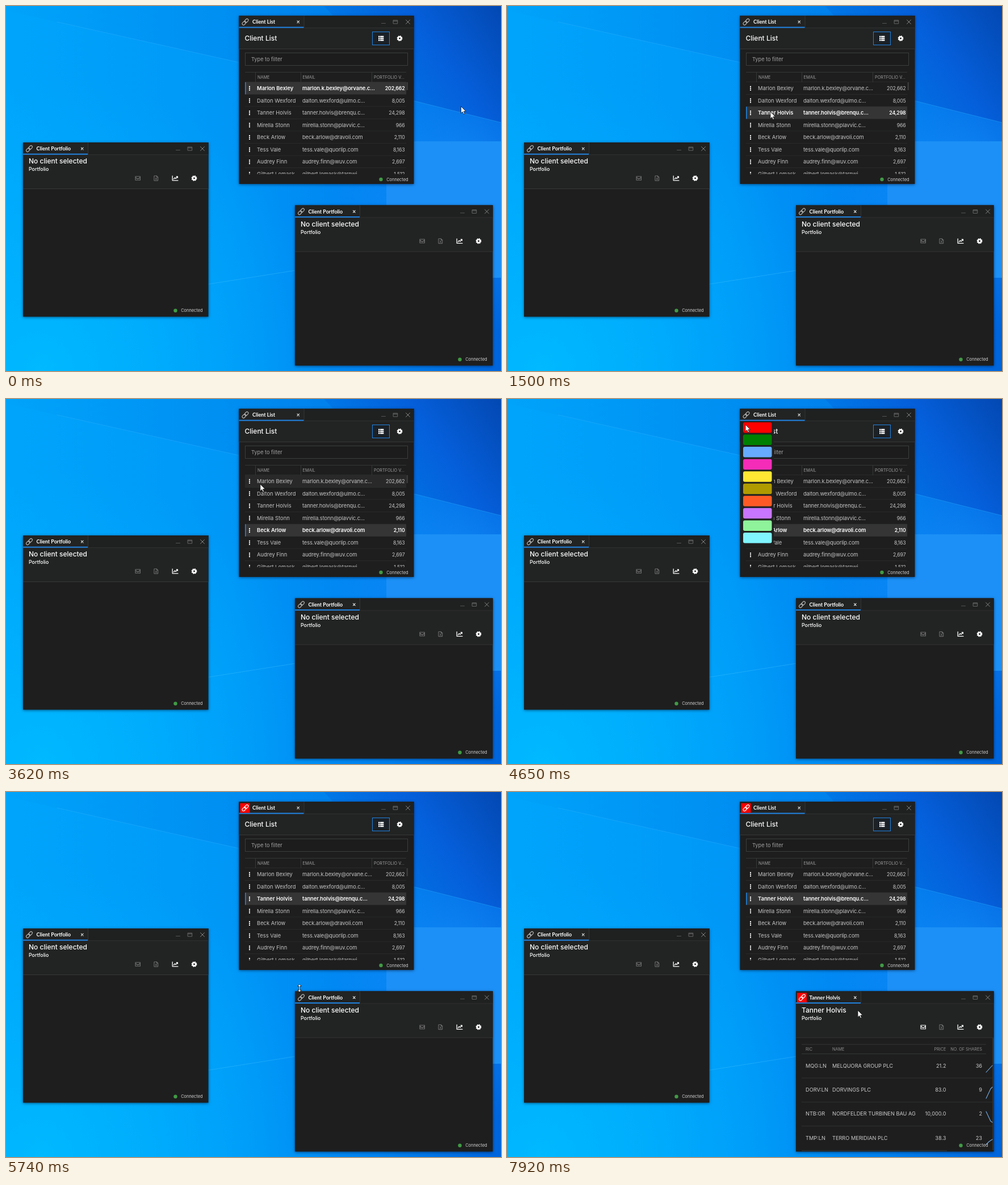
Animation of 872x642 px, one loop 7990 ms. Source, as an HTML page:

```html
<!DOCTYPE html>
<html lang="en">
<head>
<meta charset="utf-8">
<title>Linked client windows</title>
<style>
html, body { margin: 0; width: 100%; height: 100%; overflow: hidden; background: #0090f0; }
svg { display: block; width: 872px; height: 642px; font-family: Inter, "Open Sans", sans-serif; }
.tab { font-family: Lato, "Open Sans", sans-serif; font-weight: 700; }
.line { fill: none; stroke-linecap: round; stroke-linejoin: round; }
.window { filter: drop-shadow(0 1px 2.5px rgba(0, 20, 50, .6)); }
</style>
</head>
<body>
<svg id="stage" viewBox="0 0 872 642" xmlns="http://www.w3.org/2000/svg"></svg>
<script>
const LOOP = 7990;
const BLUE = '#1f82e0';
const ROW_TOP = 134, ROW_H = 21.57;

const clients = [
  ['Marlon Bexley', 'marlon.k.bexley@orvane.c...', '202,662'],
  ['Dalton Wexford', 'dalton.wexford@ulmo.c...', '8,005'],
  ['Tanner Holvis', 'tanner.holvis@brenqu.c...', '24,298'],
  ['Mirella Stonn', 'mirella.stonn@plavvic.c...', '966'],
  ['Beck Arlow', 'beck.arlow@dravoli.com', '2,110'],
  ['Tess Vale', 'tess.vale@quorlip.com', '8,163'],
  ['Audrey Finn', 'audrey.finn@wuv.com', '2,697'],
  ['Gilbert Lomask', 'gilbert.lomask@tarnwi...', '1,512']
];
const holdings = [
  ['MQG:LN', 'MELQUORA GROUP PLC', '21.2', '36', 'M844 493L855 481'],
  ['DORV:LN', 'DORVINGS PLC', '83.0', '9', 'M844 539L852 522L855 519'],
  ['NTB:GR', 'NORDFELDER TURBINEN BAU AG', '10,000.0', '2', 'M844 562L852 579L855 581'],
  ['TMP:LN', 'TERRO MERIDIAN PLC', '38.3', '23', 'M844 620L849 615L855 611']
];
const swatches = ['#ff0000', '#008000', '#66abff', '#f42cb8', '#ffe733',
  '#b09b00', '#ff5a26', '#c876ff', '#8ef39a', '#80f5ff'];

// start, end, steps, destination
const moves = [
  [480, 1060, 11, 464, 186],
  [1820, 2130, 6, 466, 230],
  [3310, 4080, 14, 420, 26],
  [4410, 4650, 4, 420, 45],
  [5140, 5680, 10, 517, 333],
  [5740, 5740, 1, 517, 345],
  [5810, 5910, 2, 519, 358],
  [6240, 6490, 4, 581, 359],
  [6560, 6680, 3, 523, 376],
  [7260, 7260, 1, 524, 376],
  [7450, 7450, 1, 525, 376],
  [7610, 7920, 6, 618, 384]
];
const clicks = [[1250, 1500], [2330, 2610], [4140, 4340], [4900, 5080], [5990, 6150], [6870, 7070]];
const picks = [[0, 0], [1380, 2], [2460, 4], [5020, 2]];

const rect = (x, y, w, h, fill, extra = '') =>
  `<rect x="${x}" y="${y}" width="${w}" height="${h}" fill="${fill}" ${extra}/>`;
const path = (d, stroke, width = 1, extra = '') =>
  `<path class="line" d="${d}" stroke="${stroke}" stroke-width="${width}" ${extra}/>`;
const text = (x, y, s, size, fill, extra = '') =>
  `<text x="${x}" y="${y}" font-size="${size}" fill="${fill}" ${extra}>${s}</text>`;
const group = (id, body, extra = '') => `<g id="${id}" ${extra}>${body}</g>`;
const at = (x, y, body) => `<g transform="translate(${x} ${y})">${body}</g>`;
const END = 'text-anchor="end"';

const icons = {
  link: color => `<g transform="rotate(-45)" fill="none" stroke="${color}" stroke-width="1.1">
    <rect x="-6.7" y="-2.3" width="7.4" height="4.6" rx="2.3"/>
    <rect x="-.7" y="-2.3" width="7.4" height="4.6" rx="2.3"/></g>`,
  gear: () => `<g fill="none" stroke="#fff"><circle r="2.7" stroke-width="2.5"/>
    <circle r="4.2" stroke-width="1.5" stroke-dasharray="1.9 1.4"/></g>`,
  chart: () => path('M-4.8-4V3.8H5', '#fff', 1.3) +
    path('M-2.6 1.2L-.6-1L1 .5L4.2-2.8M2.2-3H4.4V-.8', '#fff', 1.3),
  mail: color => path('M-4.2-3.2H4.2V3.2H-4.2ZM-4.2-1.5L0 1.3L4.2-1.5', color, 1.1),
  sheet: () => path('M-3.2-4.2H1L3.2-2V4.2H-3.2ZM1-4.2V-2H3.2M-1.2-.6L1.2 2.6M1.2-.6L-1.2 2.6', '#747474', 1),
  list: () => [-3.2, 0, 3.2].map(y => rect(-4.7, y - 1.2, 2.4, 2.4, '#fff') + rect(-1.6, y - 1.2, 6.3, 2.4, '#fff')).join('')
};

function wallpaper() {
  return `<defs>
    <linearGradient id="sky"><stop offset="0" stop-color="#00a5fb"/><stop offset=".45" stop-color="#0097f7"/>
      <stop offset=".75" stop-color="#0082f0"/><stop offset="1" stop-color="#0065dd"/></linearGradient>
    <radialGradient id="glow" cx="60" cy="640" r="520" gradientUnits="userSpaceOnUse">
      <stop offset="0" stop-color="#00b9ff"/><stop offset="1" stop-color="#00b0ff" stop-opacity="0"/></radialGradient>
    <radialGradient id="halo" cx="800" cy="330" r="250" gradientUnits="userSpaceOnUse">
      <stop offset="0" stop-color="#1a94ff" stop-opacity=".8"/><stop offset="1" stop-color="#1088f8" stop-opacity="0"/></radialGradient>
    <linearGradient id="dusk" x1="640" y1="160" x2="872" y2="0" gradientUnits="userSpaceOnUse">
      <stop offset="0" stop-color="#0068dd" stop-opacity=".2"/><stop offset=".5" stop-color="#0560dc"/>
      <stop offset="1" stop-color="#0348b2"/></linearGradient>
    <linearGradient id="beam" x1="0" y1="0" x2="720" y2="0" gradientUnits="userSpaceOnUse">
      <stop offset="0" stop-color="#0086ea" stop-opacity=".05"/><stop offset="1" stop-color="#0070e0" stop-opacity=".5"/></linearGradient>
    <clipPath id="listClip"><rect x="420" y="134" width="289" height="161.5"/></clipPath>
  </defs>` +
    rect(0, 0, 872, 642, 'url(#sky)') + rect(0, 0, 872, 642, 'url(#glow)') + rect(0, 0, 872, 642, 'url(#halo)') +
    `<path d="M0 0H872V205L719 167L410 99L90 28L0 8Z" fill="url(#beam)"/>
     <path d="M560 0H872V205L719 167Z" fill="url(#dusk)"/>` +
    path('M90 28L410 99M719 167L872 205', '#35b4ff', 1, 'opacity=".4"') +
    path('M130 525L510 465', '#45c4ff', 1, 'opacity=".4"') +
    rect(670, 238, 240, 240, '#1c90f6');
}

function frameOf(id, x, y, w, h, title, headH, statusUp) {
  const r = x + w, cy = y + 11;
  return rect(x, y, w, h, '#1e1e1e', 'class="window"') +
    rect(x, y, w, headH, '#222323') +
    rect(x + 114, y, w - 114, 21, '#1f2020') +
    rect(x, y + 21, w, 1, '#303131') +
    rect(x + 114, y, 1, 21, '#343535') +
    rect(x, y + 19.6, 114, 2, BLUE) +
    rect(x, y + headH, w, 1, '#363737') +
    group(id + 'Red', rect(x + 2, y + 2.8, 17, 16.8, '#f00')) +
    at(x + 11, cy, group(id + 'Link', icons.link('#b4b4b4'))) +
    text(x + 23.5, y + 14.4, title, 9, '#fff', `class="tab" id="${id}Tab"`) +
    path(`M${x + 102.5} ${y + 9.2}l3.6 3.6m0-3.6l-3.6 3.6`, '#eee', 1.1) +
    path(`M${r - 57} ${y + 13.5}h7`, '#555', 1) +
    path(`M${r - 36} ${y + 8}h7.2v6h-7.2zM${r - 36} ${y + 9.6}h7.2`, '#666', 1) +
    path(`M${r - 14} ${y + 7.5}l7 7m0-7l-7 7`, '#858585', 1) +
    at(r, y + h - statusUp, '<circle cx="-58" r="3.2" fill="#419a45"/>');
}

const status = (r, cy) => text(r - 10, cy + 2.7, 'Connected', 7.4, '#d0d0d0', END);

function clientRow([name, mail, value], i) {
  const y = ROW_TOP + i * ROW_H, base = y + 14;
  const cell = (x, s, extra = '') => text(x, base, s, 9.4, '#c4c4c4', extra);
  const dots = [-3, 0, 3].map(d => rect(428, y + 9.8 + d, 2, 2, '#fff')).join('');
  return group('row' + i,
    rect(421, y, 284, ROW_H, '#333') +
    rect(421, y + ROW_H - .5, 284, 1, '#353636') +
    rect(421, y, 1.6, ROW_H, BLUE) + dots +
    cell(442, name) + cell(522, mail, 'letter-spacing="-.12"') +
    text(702.5, base, value, 8.8, '#c4c4c4', END + ' letter-spacing="-.2"'));
}

function clientList() {
  const label = (x, s) => text(x, 127.8, s, 7.3, '#9c9c9c');
  return frameOf('a', 410.5, 17, 308, 296, 'Client List', 58, 8) +
    text(420.5, 61, 'Client List', 12, '#fff', 'font-weight="500"') +
    rect(645.5, 45.5, 30, 23, '#1b2127', `stroke="${BLUE}"`) +
    at(660.7, 57, icons.list()) + at(693.5, 57, icons.gear()) +
    rect(421.5, 82.5, 286, 22, '#1c1c1c', 'stroke="#3b3c3c"') +
    text(432, 97, 'Type to filter', 9.2, '#a2a2a2') +
    rect(421, 116, 284, 1, '#353636') + rect(421, 133.5, 284, 1, '#353636') +
    [439, 519, 644].map(x => rect(x, 117, 1, 17, '#353636')).join('') +
    label(443, 'NAME') + label(522.5, 'EMAIL') + label(648, 'PORTFOLIO V...') +
    `<g clip-path="url(#listClip)">${clients.map(clientRow).join('')}${rect(705.5, 134, 2.5, 14, '#3b3b3b')}</g>` +
    status(718.5, 305);
}

function portfolio(id, x, y, w, h, body = '') {
  const r = x + w, iy = y + 63;
  return frameOf(id, x, y, w, h, 'Client Portfolio', 81, 10.8) +
    text(x + 10, y + 37.2, 'No client selected', 12, '#fff', `font-weight="500" id="${id}Title"`) +
    text(x + 10, y + 50.4, 'Portfolio', 8.8, '#fff', 'font-weight="500"') +
    at(r - 124.3, iy, group(id + 'Mail', icons.mail('#747474'))) +
    at(r - 92, iy, icons.sheet()) + at(r - 58.5, iy, icons.chart()) + at(r - 25, iy, icons.gear()) +
    body + status(r, y + h - 10.8);
}

function holdingsTable() {
  const label = (x, s, extra) => text(x, 454.8, s, 7.3, '#8e8e8e', extra);
  const heads = label(526, 'RIC') +
    group('wide', label(569, 'NAME') + label(664, 'PRICE') + label(765, 'NO. OF SHARES')) +
    group('fitted', label(573, 'NAME') + label(773.5, 'PRICE', END) + label(837, 'NO. OF SHARES', END) +
      rect(855, 433, 2, 197, '#303131') + rect(519, 630, 256, 1.5, '#303131'));
  const rows = holdings.map(([code, name, price, count, trend], i) => {
    const cell = (x, s, extra) => text(x, 484.8 + i * 42.3, s, 9.2, '#cacaca', extra);
    const rule = i < 3 ? rect(519, 502.5 + i * 42.3, 336, 1, '#303131') : '';
    return cell(526, code) + cell(573, name) + cell(773.5, price, END) + cell(837, count, END) +
      rule + path(trend, '#78aee6', 1.1);
  }).join('');
  return group('table', rect(519, 443.5, 325, 1, '#343535') + rect(519, 460, 325, 1, '#343535') +
    heads + group('rows', rows));
}

function palette(id, x, y) {
  return group(id, rect(x, y, 59, 218, '#202121') +
    swatches.map((c, i) => rect(x + 5, y + 2 + i * 21.55, 50.5, 18.5, c, 'rx="3"')).join(''));
}

const stage = document.getElementById('stage');
stage.innerHTML = wallpaper() + portfolio('b', 30, 240, 326.5, 306.5) + clientList() +
  portfolio('c', 509, 350.5, 348.5, 282, holdingsTable()) +
  palette('listPalette', 411, 39) + palette('portfolioPalette', 510, 371.5) +
  '<circle id="click" r="9" fill="#f0dc00" opacity=".72"/>' +
  group('arrow', '<path d="M0 0V12.2L2.8 9.6L4.6 13.8L6.6 13L4.8 8.8H8.6Z" fill="#fff" stroke="#111" stroke-width=".8"/>') +
  group('resize', '<path d="M0-7L3.4-3.4H1V3.4H3.4L0 7L-3.4 3.4H-1V-3.4H-3.4Z" fill="#fff" stroke="#111" stroke-width=".8"/>');

const el = {};
stage.querySelectorAll('[id]').forEach(n => el[n.id] = n);
const show = (id, on) => el[id].setAttribute('visibility', on ? 'visible' : 'hidden');
const place = (id, x, y) => el[id].setAttribute('transform', `translate(${x} ${y})`);
const within = (t, a, b) => t >= a && t < b;
const ease = p => p * p * (3 - 2 * p);

function pointer(t) {
  let x = 801.5, y = 176.5;
  for (const [a, b, n, tx, ty] of moves) {
    if (t < a) break;
    const step = b > a ? Math.min(n, Math.floor((t - a) / (b - a) * (n - 1) + 1e-6) + 1) : n;
    const p = ease(step / n);
    x += (tx - x) * p;
    y += (ty - y) * p;
  }
  return [x, y];
}

function paintRows(selected, hovered) {
  clients.forEach((_, i) => {
    const on = i === selected;
    const [back, , mark] = el['row' + i].querySelectorAll('rect');
    back.setAttribute('fill', on ? '#353535' : i === hovered ? '#292929' : '#1e1e1e');
    mark.setAttribute('visibility', on ? 'visible' : 'hidden');
    el['row' + i].querySelectorAll('text').forEach(n => {
      n.setAttribute('fill', on ? '#fff' : '#c4c4c4');
      n.setAttribute('font-weight', on ? 600 : 400);
    });
  });
}

function render(t) {
  const [x, y] = pointer(t);
  const listOpen = within(t, 4280, 4960), portfolioOpen = within(t, 6110, 6870);
  const overRows = !listOpen && x >= 421 && x <= 705 && y >= ROW_TOP && y < 295;
  const selected = picks.filter(p => p[0] <= t).pop()[1];
  paintRows(selected, overRows ? Math.floor((y - ROW_TOP) / ROW_H) : -1);

  const loaded = t >= 6870, linked = t >= 6970;
  const red = { a: t >= 4960, b: false, c: linked };
  for (const id in red) {
    show(id + 'Red', red[id]);
    el[id + 'Link'].firstChild.setAttribute('stroke', red[id] ? '#fff' : '#b4b4b4');
  }
  const client = clients[2][0];
  el.cTitle.textContent = loaded ? client : 'No client selected';
  el.cTab.textContent = linked ? client : 'Client Portfolio';
  el.cMail.firstChild.setAttribute('stroke', loaded ? '#fff' : '#747474');

  el.table.style.display = loaded ? '' : 'none';
  show('wide', t < 7070);
  show('fitted', t >= 7070);
  show('rows', t >= 7450);
  show('listPalette', listOpen);
  show('portfolioPalette', portfolioOpen);

  const resizing = within(t, 5740, 5810);
  show('arrow', !resizing);
  show('resize', resizing);
  place('arrow', x, y);
  place('resize', x, y);
  show('click', clicks.some(([a, b]) => within(t, a, b)));
  place('click', x + .3, y + .8);
}

const start = performance.now();
function tick() {
  render((performance.now() - start) % LOOP);
  requestAnimationFrame(tick);
}
tick();
</script>
</body>
</html>
```
